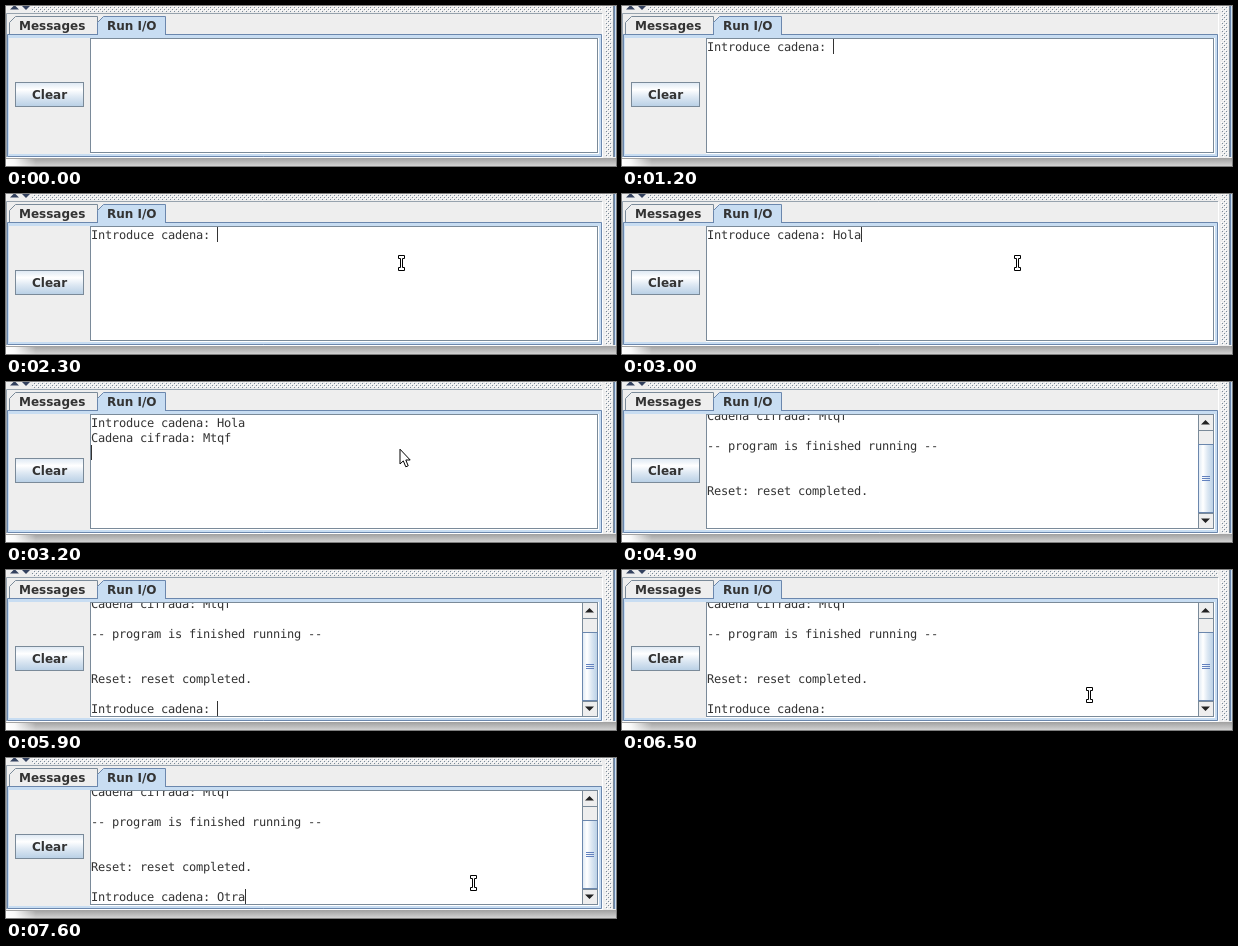
Animation of 610 by 160 pixels, one loop 8000 ms. Source, as an HTML page:

```html
<!DOCTYPE html>
<html lang="es">
<head>
<meta charset="utf-8">
<title>Run I/O console</title>
<style>
html, body { margin: 0; width: 100%; height: 100%; overflow: hidden; background: #eee; }
svg { display: block; width: 610px; height: 160px; }
.label { font: bold 12px "DejaVu Sans", sans-serif; fill: #333; }
.console { font: 12px "DejaVu Sans Mono", monospace; letter-spacing: -.224px; fill: #333;
  white-space: pre; text-rendering: geometricPrecision; }
</style>
</head>
<body>
<svg viewBox="0 0 610 160" xmlns="http://www.w3.org/2000/svg">
  <defs>
    <pattern id="bumps" x="3" width="4" height="4" patternUnits="userSpaceOnUse" shape-rendering="crispEdges">
      <path d="M0 0h1v1h-1zM2 2h1v1h-1z" fill="#fff"/>
      <path d="M1 1h1v1h-1zM3 3h1v1h-1z" fill="#7a8a99"/>
    </pattern>
    <linearGradient id="metal" x2="0" y2="1">
      <stop stop-color="#dde8f3"/><stop offset=".3" stop-color="#fff"/>
      <stop offset=".6" stop-color="#dde8f3"/><stop offset="1" stop-color="#b8cfe5"/>
    </linearGradient>
    <linearGradient id="thumb" href="#metal" x2="1" y2="0"/>
    <linearGradient id="shadow" x2="0" y2="1">
      <stop stop-color="#a0a0a0"/><stop offset="1" stop-color="#d2d2d2"/>
    </linearGradient>
    <linearGradient id="corner">
      <stop stop-color="#fff"/><stop offset=".3" stop-color="#fff" stop-opacity=".9"/>
      <stop offset="1" stop-color="#fff" stop-opacity="0"/>
    </linearGradient>
    <clipPath id="view"><rect id="viewBox" x="85" y="33" width="506" height="113"/></clipPath>
  </defs>

  <!-- Split pane dividers -->
  <rect width="610" height="160" fill="#eee"/>
  <rect x="26" width="570" height="6" fill="url(#bumps)"/>
  <rect x="599" width="7" height="151" fill="url(#bumps)"/>
  <path d="M4 3.5L8.5-1L13 3.5ZM15-1H25L20 4Z" fill="#33415e"/>
  <path d="M.5 151V7.5H596" fill="none" stroke="#7a8a99" stroke-opacity=".75"/>
  <path d="M596.5 8V151.5H1" fill="none" stroke="#fff"/>
  <path d="M607.5 0V151" stroke="#7a8a99"/>
  <path d="M608.5 0V151" stroke="#6b87ad"/>
  <path d="M609.5 0V151" stroke="#c8ddf2"/>

  <!-- Tabbed pane -->
  <rect x="1" y="28" width="595" height="123" fill="#c8ddf2"/>
  <rect x="3" y="32" width="590" height="116" fill="#eee"/>
  <path d="M3.5 28V16.5L9.5 10.5H91.5V28" fill="#eee" stroke="#7a8a99"/>
  <path d="M91.5 29V16.5L97.5 10.5H159.5V29" fill="#c8ddf2" stroke="#6b87ad"/>
  <path d="M92 28.5H1.5V150.5H595.5V28.5H159" fill="none" stroke="#6b87ad"/>
  <text class="label" x="13" y="24">Messages</text>
  <text class="label" x="101" y="24">Run I/O</text>
  <rect x="9.5" y="76.5" width="68" height="24" fill="url(#metal)" stroke="#7a8a99"/>
  <text class="label" x="26" y="93">Clear</text>

  <!-- Window shadow -->
  <rect y="152" width="610" height="8" fill="url(#shadow)"/>
  <rect y="153" width="30" height="7" fill="url(#corner)"/>

  <rect x="84" y="32" width="509" height="116" fill="#fff"/>
  <rect x="84.5" y="32.5" width="507" height="114" fill="#fff" stroke="#7a8a99"/>
  <g clip-path="url(#view)">
    <g id="page"></g>
    <rect id="caret" width="1" height="15" fill="#333"/>
  </g>

  <g id="scrollbar">
    <rect x="576.5" y="32.5" width="15" height="114" fill="#eee" stroke="#7a8a99"/>
    <path d="M577 48.5H591M577 131.5H591" stroke="#7a8a99"/>
    <rect x="576.5" y="62.5" width="15" height="68" fill="url(#thumb)" stroke="#6b87ad"/>
    <path d="M580 94.5h8m-8 2h8m-8 2h8" stroke="#6382bf"/>
    <path d="M579 42.5L583.5 38L588 42.5ZM579 136.5L583.5 141L588 136.5Z" fill="#222"/>
  </g>

  <path id="ibeam" d="M.5.5H6.5V3.5H4.5V12.5H6.5V15.5H.5V12.5H2.5V3.5H.5Z" fill="#fff" stroke="#000"/>
  <path id="arrow" d="M1 1.2V16L4.3 12.9L6.8 18.8L9.2 17.8L6.8 12H11.2Z" fill="#fff" stroke="#000"/>
</svg>
<script>
const LOOP = 8000, LEFT = 85, TOP = 33, LINE = 15, ADVANCE = 7, BASELINE = 12;
const $ = id => document.getElementById(id);

const prompt = "Introduce cadena: ";
const finished = [prompt + "Hola", "Cadena cifrada: Mtqf", "", "-- program is finished running --"];
const reset = [...finished, "", "", "Reset: reset completed."];

// Each track lists [start time, value]; a value holds until the next start.
const output = [
  [0, []], [1200, [prompt]], [2700, [prompt + "H"]], [2800, [prompt + "Ho"]],
  [3000, [prompt + "Hola"]], [3200, [...finished.slice(0, 2), ""]], [3500, finished], [4900, reset],
  ...[[5900, ""], [7300, "O"], [7500, "Otr"], [7600, "Otra"]]
    .map(([start, typed]) => [start, [...reset, "", prompt + typed]])
];
const caretOn = [[0, false], [1200, true], [1800, false], [2300, true], [3500, false],
  [5900, true], [6400, false], [6900, true]];
const pointer = [
  [0, null], [1600, ["ibeam", 400, 2]], [1800, ["ibeam", 392, 61]],
  [3200, ["arrow", 393, 66]], [4000, null], [6300, ["ibeam", 496, 50]],
  [6400, ["ibeam", 475, 99]], [6500, ["ibeam", 464, 117]]
];

const at = (track, time) => track.findLast(([start]) => start <= time)[1];
const show = (node, visible) => node.setAttribute("display", visible ? "inline" : "none");
const move = (node, x, y) => node.setAttribute("transform", `translate(${x} ${y})`);

const rows = Array.from({ length: 9 }, (_, i) => {
  const row = document.createElementNS("http://www.w3.org/2000/svg", "text");
  row.setAttribute("class", "console");
  row.setAttribute("x", LEFT);
  row.setAttribute("y", TOP + BASELINE + i * LINE);
  $("page").append(row);
  return row;
});

function render(time) {
  const lines = at(output, time);
  const scrolled = time >= 4900;
  const scroll = scrolled ? 22 : 0;
  rows.forEach((row, i) => {
    const text = lines[i] || "";
    if (row.textContent !== text) row.textContent = text;
  });
  move($("page"), 0, -scroll);
  show($("scrollbar"), scrolled);
  $("viewBox").setAttribute("width", scrolled ? 491 : 506);

  const last = lines.length - 1;
  show($("caret"), at(caretOn, time));
  if (last >= 0) move($("caret"), LEFT + lines[last].length * ADVANCE, TOP + last * LINE - scroll);

  const [shape, x, y] = at(pointer, time) || [];
  for (const id of ["ibeam", "arrow"]) {
    show($(id), id === shape);
    if (id === shape) move($(id), x, y);
  }
}

const began = performance.now();
function tick() {
  render((performance.now() - began) % LOOP);
  requestAnimationFrame(tick);
}
tick();
</script>
</body>
</html>
```
